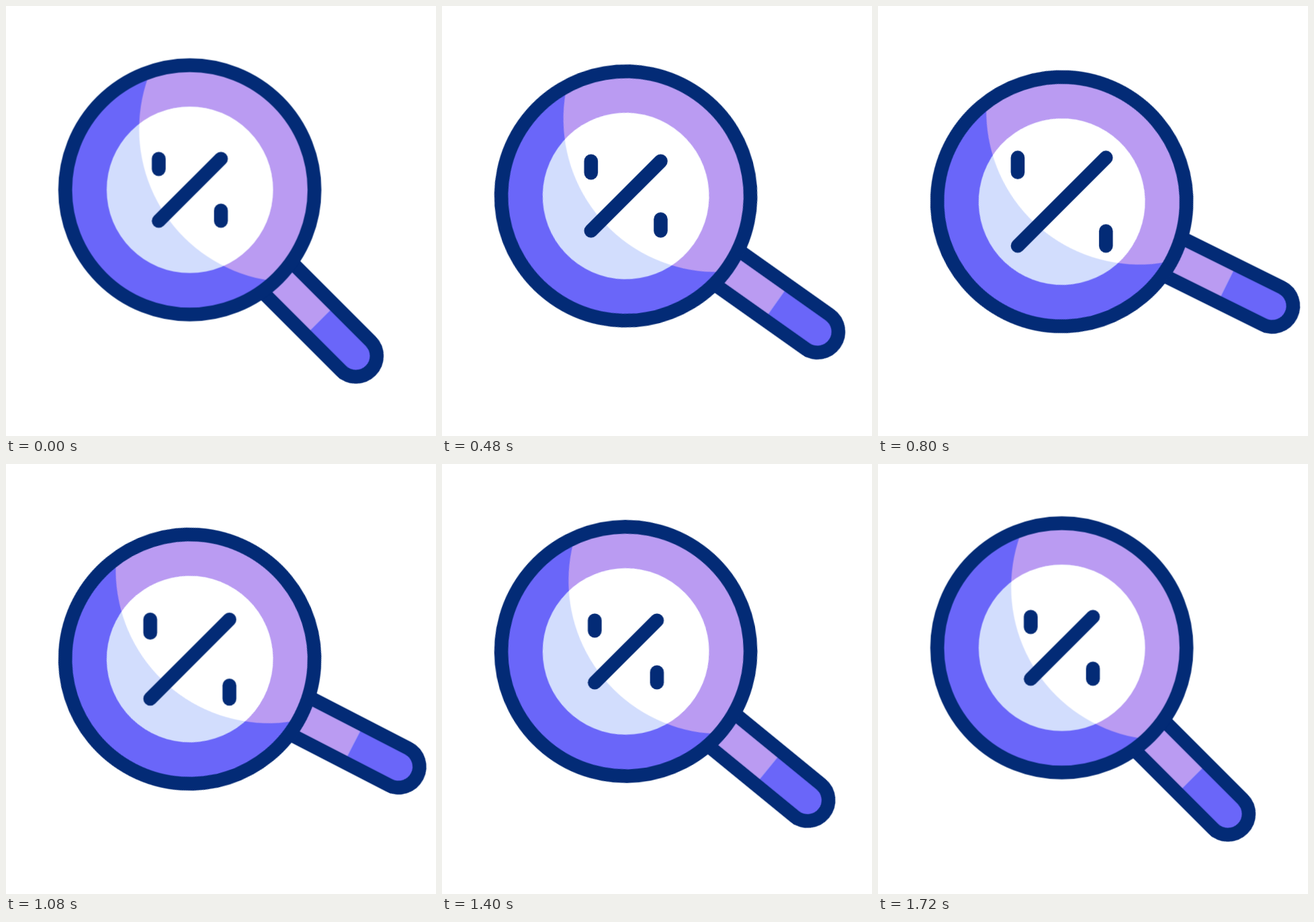
Recreate the animation shown at these times as an HTML page. Size 640 by 640 pixels, loop 1.84 s.

```html
<!DOCTYPE html>
<html lang="en">
<head>
<meta charset="utf-8">
<title>Discount search</title>
<style>
  html, body { margin: 0; width: 100%; height: 100%; overflow: hidden; background: #fff; }
  svg { display: block; width: 100%; height: 100%; }
  .line { fill: none; stroke: #032b76; stroke-width: 20.6; }
  .blue { fill: #6a66f9; }
  .lilac { fill: #ba9bf2; }
  .drop { animation: drop 1840ms infinite; }
  .swing { animation: swing 1840ms infinite; }
  .grow { animation: grow 1840ms infinite; }
  .grow path { stroke-linecap: round; vector-effect: non-scaling-stroke; }
  .drop, .swing { animation-timing-function: cubic-bezier(.5, 0, .5, 1); }
  .grow { animation-timing-function: cubic-bezier(.333, 0, .667, 1); }
  @keyframes drop {
    0%, 2.4%, 93.5%, 100% { transform: translate(273.6px, 273.6px); }
    49.5% { transform: translate(273.6px, 291.7px); }
  }
  @keyframes swing {
    0%, 2.4%, 93.5%, 100% { transform: rotate(0deg); }
    49.5% { transform: rotate(-19.1deg); }
  }
  @keyframes grow {
    0%, 15.2%, 76.1%, 100% { transform: scale(1); }
    46.7% { transform: scale(1.43); }
  }
</style>
</head>
<body>
<svg viewBox="0 0 640 640">
  <defs>
    <clipPath id="rim"><circle r="180"/></clipPath>
    <clipPath id="glass"><circle r="123.8"/></clipPath>
  </defs>
  <g class="drop">
    <g class="swing">
      <g transform="rotate(45)">
        <path class="lilac" d="M180-25h94.4v50H180z"/>
        <path class="blue" d="M274.4-31H349.6a31 31 0 0 1 0 62H274.4z"/>
        <path class="line" d="M180-31H349.6a31 31 0 0 1 0 62H180"/>
      </g>
      <circle class="blue" r="185.5"/>
      <g clip-path="url(#rim)"><circle class="lilac" cx="152.5" cy="-90.5" r="228"/></g>
      <circle r="123.8" fill="#d2ddfd"/>
      <g clip-path="url(#glass)"><circle cx="152.5" cy="-90.5" r="228" fill="#fff"/></g>
      <circle class="line" r="185.5"/>
    </g>
    <g class="grow">
      <path class="line" d="M-46.3 46.3L46.3-46.3"/>
      <path class="line" d="M-46.3-46.3v15.4"/>
      <path class="line" d="M46.3 30.9v15.4"/>
    </g>
  </g>
</svg>
</body>
</html>
```
